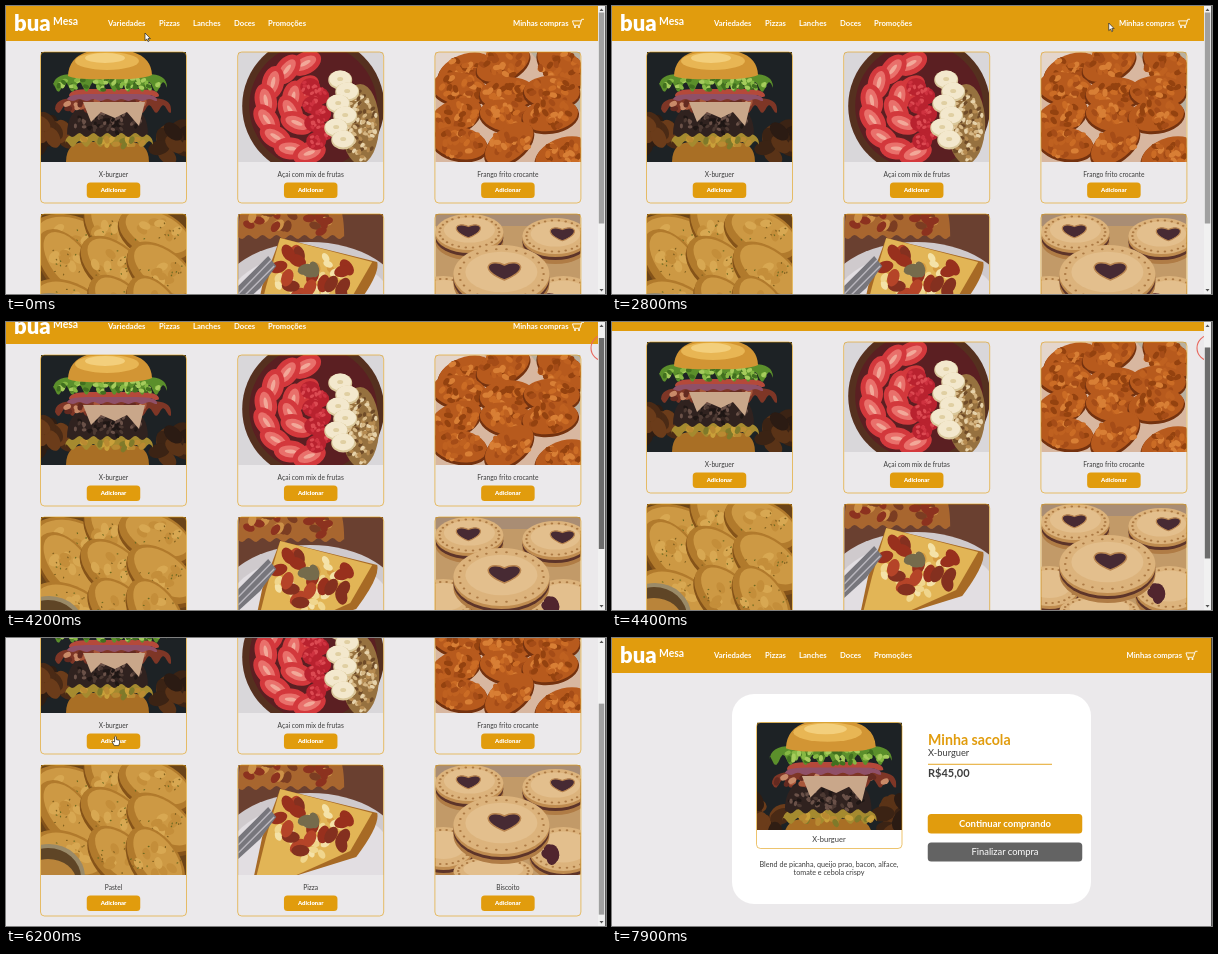
Write an HTML page that moves like this. It is 600 by 288 pixels and loops after 8000 ms.

```html
<!DOCTYPE html>
<html lang="pt-BR">
<head>
<meta charset="utf-8">
<title>Cardápio</title>
<style>
html, body { margin: 0; width: 100%; height: 100%; overflow: hidden; background: #ebe9eb; }
svg { display: block; }
text { font-family: Lato, "Open Sans", sans-serif; fill: #3c3c3c; }
.b { font-weight: 700; }
.h { font-weight: 900; }
.w { fill: #fff; }
.o { fill: #e19c0d; }
.c { text-anchor: middle; }
.over { fill: #8b8794; }
</style>
</head>
<body>
<svg id="stage" width="600" height="288" viewBox="0 0 600 288"></svg>
<script>
const ORANGE = '#e19c0d';
let seed = 7;
const rnd = () => (seed = seed * 16807 % 2147483647) / 2147483647;
const jitter = size => (rnd() - .5) * size;
const pick = list => list[Math.floor(rnd() * list.length)];
const repeat = (n, draw) => Array.from({ length: n }, (_, i) => draw(i)).join('');

const rect = (x, y, w, h, fill, r = 0, more = '') =>
  `<rect x="${x}" y="${y}" width="${w}" height="${h}" rx="${r}" fill="${fill}" ${more}/>`;
const oval = (x, y, rx, ry, fill, turn = 0) =>
  `<ellipse rx="${rx}" ry="${ry}" fill="${fill}" transform="translate(${x.toFixed(1)} ${y.toFixed(1)}) rotate(${turn.toFixed(0)})"/>`;
const path = (d, fill, more = '') => `<path d="${d}" fill="${fill}" ${more}/>`;
const line = (d, color, width) => path(d, 'none', `stroke="${color}" stroke-width="${width}"`);
const text = (x, y, size, cls, str) => `<text x="${x}" y="${y}" font-size="${size}" class="${cls}">${str}</text>`;

// Small random spots inside an oval
const spots = (n, x, y, rx, ry, r, colors) => repeat(n, () => {
  const a = rnd() * 6.283, d = Math.sqrt(rnd());
  return oval(x + d * rx * Math.cos(a), y + d * ry * Math.sin(a), r, r * .65, pick(colors), rnd() * 180);
});

// Rows of overlapping pieces, loosely shuffled
const heap = (cols, rows, piece) => repeat(cols * rows, i =>
  piece(145 * (i % cols + .5) / cols + jitter(14), 110 * (Math.floor(i / cols) + .5) / rows + jitter(12)));

// Horizontal layer with a wavy lower edge
const layer = (x1, x2, top, bottom, wave, fill) => {
  let d = `M${x1} ${bottom}Q${x1} ${top} ${x1 + 20} ${top}H${x2 - 20}Q${x2} ${top} ${x2} ${bottom}`;
  for (let x = x2; x >= x1; x -= 2) d += `L${x} ${(bottom + wave * Math.sin(x * .45)).toFixed(1)}`;
  return path(d + 'Z', fill);
};

const burger = () => rect(0, 0, 145, 110, '#1d2225') +
  spots(14, 8, 88, 18, 20, 11, ['#4a2a15', '#6b3c1a', '#2f1d13']) +
  spots(14, 133, 92, 20, 18, 11, ['#3b2314', '#5a3317', '#2b1b13']) +
  layer(25, 108, 90, 110, 0, '#a96f25') +
  layer(24, 112, 80, 92, 3, '#a58a2f') + spots(16, 68, 90, 40, 4, 4, ['#c9a03a', '#7f7a2a', '#b98a32']) +
  layer(26, 107, 56, 83, 2, '#30221f') + spots(60, 67, 72, 37, 11, 2.4, ['#1f1715', '#4d3a33', '#6a5148']) +
  layer(14, 130, 46, 57, 4, '#7e3626') + spots(24, 70, 54, 55, 5, 4, ['#a9573a', '#c98a68', '#642a20']) +
  path('M42 50H104L98 74L86 60L74 66L60 60L50 70Z', '#c9a78a') +
  layer(28, 118, 37, 44, 1, '#b5493a') + layer(26, 116, 42, 48, 1, '#8f5068') +
  layer(12, 126, 22, 35, 5, '#5b8f2b') + spots(50, 69, 32, 53, 7, 3, ['#86b843', '#41701f', '#a5cc5c']) +
  path('M27 24Q28 -3 68 -3Q110 -3 111 23Q100 28 68 27Q36 28 27 24Z', '#d29534') +
  oval(66, 9, 32, 9, '#e8b654') + oval(64, 6, 20, 5, '#f3cf7c');

function acai() {
  const berry = (ring, a) => {
    const x = 72 + ring * Math.cos(a), y = 56 + ring * Math.sin(a), turn = a * 57 + 70;
    return oval(x, y, 17, 11, '#d3383c', turn) + oval(x, y, 12, 6, '#e9706b', turn) + oval(x, y, 6, 2, '#f2a899', turn);
  };
  return rect(0, 0, 145, 110, '#d9d7da') + oval(75, 54, 71, 70, '#55301f') + oval(75, 54, 64, 63, '#5b1f22') +
    oval(122, 72, 19, 40, '#96713f') + spots(110, 122, 72, 17, 36, 2.6, ['#d6b784', '#b58a50', '#6f4b28', '#e6d2aa']) +
    repeat(8, i => berry(45, 4.6 - i * .43)) + repeat(4, i => berry(20, 4.4 - i * .7)) +
    repeat(7, i => {
      const x = 72 + 8 * (i % 2) + i, y = 35 + i * 9;
      return oval(x, y, 10, 9, '#b9222f') + spots(8, x, y, 8, 7, 2.4, ['#dc4a52', '#cf3340']);
    }) +
    repeat(6, i => {
      const x = 102 - i + 8 * (i % 2), y = 27 + i * 12;
      return oval(x, y + 1, 12, 9.5, '#d9c79a') + oval(x, y, 11, 8.5, '#f3e8cd') + oval(x, y, 3, 2, '#e0cfa2');
    });
}

const chicken = () => rect(0, 0, 145, 110, '#d8b7a0') + path('M95 0H145V60Z', '#b9b0a0') + path('M0 0H50L0 40Z', '#e4d6cc') +
  heap(3, 4, (x, y) => {
    const turn = jitter(120);
    return oval(x, y + 2, 29, 17, '#74320f', turn) + oval(x, y, 28, 16, '#b75a1d', turn) +
      spots(26, x, y, 22, 13, 4, ['#cb6c25', '#a54c17', '#d87f35', '#94420f', '#bf6120']);
  });

const pastries = () => rect(0, 0, 145, 110, '#6b4418') +
  heap(3, 3, (x, y) => {
    const turn = 35 + jitter(50);
    return oval(x, y + 3, 40, 24, '#855319', turn) + oval(x, y, 39, 23, '#b17a2c', turn) + oval(x + 2, y - 2, 34, 18, '#cd9944', turn) +
      spots(8, x, y, 22, 14, 6, ['#d8a852', '#c48e3a']) + spots(14, x, y, 26, 16, 1, ['#6d6b22', '#80601f']);
  }) +
  oval(8, 112, 36, 33, '#9a8a68') + oval(7, 113, 33, 30, '#5f4526') + oval(7, 116, 28, 22, '#b9843a');

const pizza = () => rect(0, 0, 145, 110, '#6a4030') + layer(0, 106, -20, 23, 2, '#a8662f') +
  spots(24, 50, 8, 50, 13, 6, ['#8c321f', '#cc9148', '#7b3d22']) +
  oval(72, 86, 92, 58, '#cfcacd') + oval(72, 90, 82, 50, '#e2dee2') +
  path('M42 24L139 48Q142 60 118 92L60 110H16L24 72Z', '#a76a25') + path('M42 24L134 48L112 86L54 112H18L28 72Z', '#e2b556') +
  spots(30, 72, 66, 36, 28, 5, ['#f0d68d', '#d69b40', '#f4e2a8']) +
  spots(17, 76, 62, 44, 30, 9, ['#98301d', '#b54428', '#84301f']) + spots(3, 66, 58, 14, 8, 8, ['#756b4c']) +
  path('M0 72L30 42L38 52L22 74L0 94Z', '#77767c') + line('M0 80L33 46M0 88L36 52', '#b9b6bd', 1.5);

function cookies() {
  const cookie = (x, y, rx, ry) => oval(x, y + 10, rx, ry, '#b07c45') + oval(x, y + 6, rx, ry, '#5d3429') +
    oval(x, y + 3, rx, ry, '#bf8c50') + oval(x, y, rx, ry, '#dcb37c') + oval(x, y - 2, rx * .75, ry * .7, '#e3bf8d') +
    repeat(26, i => oval(x + rx * .88 * Math.cos(i * .2417), y + ry * .86 * Math.sin(i * .2417), 1.3, 1, '#ac7a44'));
  const heart = (x, y, k) => path('M0 9C-28 -2 -14 -13 0 -6C14 -13 28 -2 0 9Z', '#472a33',
    `transform="translate(${x} ${y}) scale(${k})" stroke="#b98550" stroke-width="1.5"`);
  return rect(0, 0, 145, 110, '#c29a68') + rect(0, 0, 145, 12, '#a98d74') +
    cookie(34, 18, 34, 18) + heart(33, 17, .75) + cookie(120, 22, 33, 18) + heart(127, 20, .75) +
    cookie(8, 82, 30, 20) + cookie(128, 84, 34, 22) + spots(4, 115, 88, 4, 4, 9, ['#51252e']) +
    cookie(58, 106, 40, 14) + cookie(66, 60, 48, 29) + heart(69, 57, 1);
}

const photo = (x, y, w, h, art, zoom = 1) => `<svg x="${x}" y="${y}" width="${w}" height="${h}"><g transform="scale(${zoom})">${art}</g></svg>`;
const frame = (x, y, w, h) => rect(x, y, w, h, 'none', 4, `stroke="${ORANGE}" stroke-width=".8" stroke-opacity=".75"`);
const button = (mid, y, w, h, size, cls, fill, label) =>
  rect(mid - w / 2, y, w, h, fill, 3.5) + text(mid, y + h / 2 + size * .35, size, cls + ' w c', label);

const links = { Variedades: 102, Pizzas: 153, Lanches: 187, Doces: 228, 'Promoções': 262, 'Minhas compras': 507 };
const header = (width, shift, cls) => rect(0, 0, width, 35, ORANGE) + text(8, 25, 22, 'h w', 'bua') + text(47, 19, 10.4, 'b w', 'Mesa') +
  Object.entries(links).map(([name, x]) => text(x > 500 ? x + shift : x, 19.8, 7.65, 'b w ' + cls, name)).join('') +
  `<g transform="translate(${shift} 0)">${line('M578 13.3h-2.2l-2 6h-6l-1.3-4.4h8.6', '#fff', .9)}${oval(569, 21, 1, 1, '#fff')}${oval(573, 21, 1, 1, '#fff')}</g>`;

const foods = [['X-burguer', burger], ['Açai com mix de frutas', acai], ['Frango frito crocante', chicken],
  ['Pastel', pastries], ['Pizza', pizza], ['Biscoito', cookies]];
const card = ([name, draw], i) => {
  const x = 34.5 + 197.2 * (i % 3), y = i < 3 ? 46 : 208, mid = x + 73;
  return photo(x + .5, y, 145, 110, draw()) + frame(x, y, 146, 151) + text(mid, y + 124.8, 6.65, 'c', name) +
    button(mid, y + 130.5, 53.5, 15.5, 5.9, 'h', ORANGE, 'Adicionar');
};

document.getElementById('stage').innerHTML = `
<g id="shop">${rect(0, 0, 600, 288, '#ebe9eb')}
  <g id="page">${foods.map(card).join('')}${header(592, 0, 'link')}</g>
  <circle id="ring" fill="none" stroke="#e8685e" stroke-width="1.1"/>
  ${rect(592, 0, 8, 288, '#f1f1f1')}<rect id="thumb" x="592.8" width="5.4" height="211"/>
  ${path('M593.5 5L595.5 2.5L597.5 5ZM593.5 283L595.5 285.5L597.5 283Z', '#555')}
  <g id="arrow">${path('M0 0V7.6L1.8 6L3 8.6L4.2 8L3 5.6H5.4Z', '#fff', 'stroke="#222" stroke-width=".7"')}</g>
  <g id="hand">${path('M-.9 5V.8Q0 -.5 .9 .8V3.6L4 4.4Q4.6 7 3.2 9.6H-1.2L-3.4 6Q-3 4.6 -.9 6Z', '#fff', 'stroke="#222" stroke-width=".7"')}</g>
</g>
<g id="bag">${rect(0, 0, 600, 288, '#ebe9eb')}${header(600, 7.5, '')}
  ${rect(120, 56, 359, 210, '#fff', 22)}
  ${photo(145, 84.5, 145, 107.5, burger(), 1.07)}${frame(144.5, 84.5, 145.5, 126)}
  ${text(217, 203.5, 7.5, 'c', 'X-burguer')}
  ${text(217, 228.5, 7.2, 'c', 'Blend de picanha, queijo prao, bacon, alface,')}
  ${text(217, 236.5, 7.2, 'c', 'tomate e cebola crispy')}
  ${text(316, 106.5, 14.2, 'b o', 'Minha sacola')}${text(316, 118, 9.3, '', 'X-burguer')}
  ${rect(316, 125.8, 124, .9, ORANGE)}${text(316, 138.5, 11, 'b', 'R$45,00')}
  ${button(393, 176, 154.5, 19.5, 9.5, 'b', ORANGE, 'Continuar comprando')}
  ${button(393, 204.5, 154.5, 19, 9.4, '', '#636363', 'Finalizar compra')}
</g>
${rect(599.2, 0, .8, 288, '#333')}`;

const $ = id => document.getElementById(id);
const set = (id, attrs) => Object.entries(attrs).forEach(([k, v]) => $(id).setAttribute(k, v));
const show = (id, on) => set(id, { display: on ? 'inline' : 'none' });
const linkEls = [...document.querySelectorAll('.link')];

// Keys are [time, value, ...]; linear in between
function at(keys, t) {
  const i = keys.findIndex(k => k[0] > t);
  if (i < 0) return keys[keys.length - 1].slice(1);
  const [a, ...from] = keys[i - 1], [b, ...to] = keys[i];
  return from.map((v, j) => v + (to[j] - v) * (t - a) / (b - a));
}
const scrollKeys = [[0, 0], [4000, 0], [4400, 26], [4900, 69], [5500, 81]];
const mouseKeys = [[0, 139, 27], [900, 186, 18], [1200, 214, 16.5], [1800, 289, 17], [2200, 289, 17], [3000, 566, 17],
  [3200, 596, 22], [5800, 596, 26], [5900, 556, 39], [6000, 95, 99], [6200, 109.5, 98], [6500, 112, 99]];

function draw(now) {
  const t = Math.floor(now % 8000 / 100) * 100;
  const [scroll] = at(scrollKeys, t), [x, y] = at(mouseKeys, t);
  const dragging = t >= 4100 && t < 5600;
  show('shop', t < 7200);
  show('bag', t >= 7200);
  set('page', { transform: `translate(0 ${-scroll})` });
  set('thumb', { y: 6.5 + scroll * .73, fill: dragging ? '#6c6c6c' : '#a0a0a0' });

  const hovered = linkEls.find(el => {
    const left = +el.getAttribute('x');
    return y < 24 && x >= left && x <= left + el.getComputedTextLength();
  });
  linkEls.forEach(el => el.classList.toggle('over', el === hovered));
  const hand = !!hovered || t >= 6000;
  show('hand', hand);
  show('arrow', !hand && x < 590);
  set(hand ? 'hand' : 'arrow', { transform: `translate(${x} ${y})` });

  show('ring', dragging || t >= 7000);
  set('ring', dragging ? { cx: 598, cy: 26, r: 13 } : { cx: 112.5, cy: 102.5, r: 15 });
  requestAnimationFrame(draw);
}
requestAnimationFrame(draw);
</script>
</body>
</html>
```
